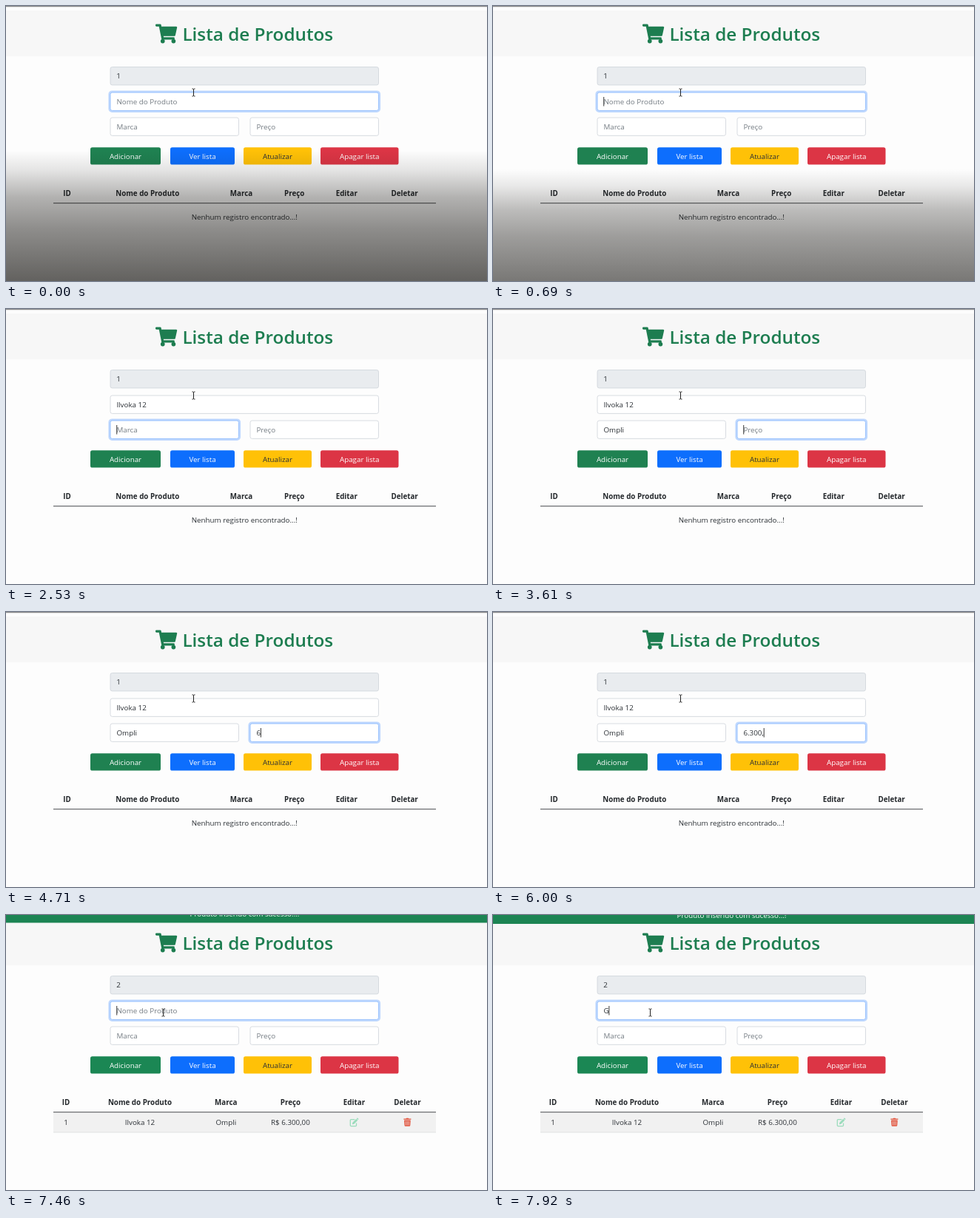
Recreate the animation shown at these times as an HTML page. Size 650 by 372 pixels, loop 8000 ms.

```html
<!DOCTYPE html>
<html lang="pt-BR">
<head>
<meta charset="utf-8">
<title>Lista de Produtos</title>
<style>
  html, body { margin: 0; width: 100%; height: 100%; overflow: hidden; background: #fdfdfd; }
  svg { display: block; width: 650px; height: 372px; }
  text { font: 9.8px "Open Sans", "Noto Sans", sans-serif; fill: #2b3035; white-space: pre; }
  .mid { text-anchor: middle; }
  .title { font-size: 24.3px; font-weight: 600; fill: #1d7d50; }
  .head { font-weight: 700; fill: #24282c; }
  .light { fill: #fff; }
</style>
</head>
<body>
<svg id="stage" viewBox="0 0 650 372">
  <defs>
    <linearGradient id="shade" x1="0" y1="0" x2="0" y2="1">
      <stop offset="0" stop-color="#0c0a06" stop-opacity="0"/>
      <stop offset=".15" stop-color="#0c0a06" stop-opacity=".1"/>
      <stop offset=".36" stop-color="#0c0a06" stop-opacity=".31"/>
      <stop offset=".6" stop-color="#0c0a06" stop-opacity=".46"/>
      <stop offset="1" stop-color="#0c0a06" stop-opacity=".64"/>
    </linearGradient>
  </defs>
</svg>
<script>
const NS = "http://www.w3.org/2000/svg";
const stage = document.getElementById("stage");
const LOOP = 8000, ADD = 6780, REFOCUS = 7300;

function el(tag, attrs, parent = stage) {
  const node = document.createElementNS(NS, tag);
  for (const key in attrs) node.setAttribute(key, attrs[key]);
  parent.appendChild(node);
  return node;
}
function set(node, attrs) {
  for (const key in attrs) node.setAttribute(key, attrs[key]);
}
function label(str, x, y, cls = "", parent = stage) {
  const node = el("text", { x, y, class: cls }, parent);
  node.textContent = str;
  return node;
}
function box(x, y, width, height, fill, stroke = "none", rx = 2.6) {
  return el("rect", { x, y, width, height, rx, fill, stroke, "stroke-width": .8 });
}
function halo(x, y, w, h, color) {
  return el("rect", { x: x - 1.2, y: y - 1.2, width: w + 2.4, height: h + 2.4, rx: 3.6,
    fill: "none", stroke: color, "stroke-width": 2.8, opacity: 0 });
}
const clamp = v => Math.max(0, Math.min(1, v));
const ease = v => v * v * (3 - 2 * v);
const show = (node, on) => node.setAttribute("visibility", on ? "visible" : "hidden");

// Page header
box(0, 6, 650, 62, "#f7f7f7", "none", 0);
const topLine = box(0, 0, 650, 1.2, "#8b8b8b", "none", 0);
const cart = el("g", { transform: "translate(202 24.4) scale(.0508)", fill: "#1d7d50" });
el("path", { d: "M24 0H126Q146 0 150 19L159 64H552Q580 66 575 93L528 301Q523 320 505 320H212L218 352H487Q514 355 510 381L504 416H164L94 64H24Q0 62 0 40V24Q0 2 24 0Z" }, cart);
for (const cx of [192, 480]) el("circle", { cx, cy: 456, r: 56 }, cart);
label("Lista de Produtos", 340.3, 47, "title mid");

// Sliding notice
const notice = el("g", {});
el("rect", { x: 0, y: -30, width: 650, height: 30, fill: "#1c8453" }, notice);
label("Produto inserido com sucesso...!", 322.5, -8.2, "light mid", notice);

// Form
box(141, 82.5, 362.5, 24.4, "#e9ecef", "#ced4da");
const idText = label("1", 149.3, 98.4);

function field(x, y, w, hint) {
  const ring = halo(x, y, w, 24.4, "#bfd8fe");
  const frame = box(x, y, w, 24.4, "#fff", "#ced4da");
  const text = label("", x + 8.4, y + 16);
  return { x, hint, ring, frame, text };
}
const fields = [
  field(141, 117, 362.5, "Nome do Produto"),
  field(141, 151, 173.5, "Marca"),
  field(330, 151, 173.5, "Preço")
];
const caret = el("rect", { width: .9, height: 12.5, fill: "#222" });

const entries = [
  { text: "Ilvoka 12", keys: [1080, 1230, 1380, 1540, 1610, 1690, 2000, 2070, 2150] },
  { text: "Ompli", keys: [2760, 2910, 3000, 3150, 3230] },
  { text: "6.300,00", keys: [4400, 4900, 5090, 5320, 5580, 5850, 6090, 6230] }
];
const again = { text: "G", keys: [7840] };
// Time at which each field gains and loses the focus
const spans = [
  [0, -500, 2380], [1, 2380, 3460], [2, 3460, ADD], [0, REFOCUS, LOOP + 500]
];

const addRing = halo(114, 191.3, 95, 23.2, "#8cc3a9");
const buttons = [
  ["Adicionar", 114, 95, "#1f8151"], ["Ver lista", 222, 87, "#0d6efd"],
  ["Atualizar", 321, 92, "#ffc107"], ["Apagar lista", 425, 105.5, "#dc3545"]
].map(([str, x, w, color], i) => {
  const rect = box(x, 191.3, w, 23.2, color);
  const text = label(str, x + w / 2, 206.6, "mid" + (i === 2 ? "" : " light"));
  return { rect, text };
});

// Table
const rowBg = box(64, 267, 517, 27, "#f1f1f1", "none", 0);
const rowLine = box(64, 293.6, 517, .8, "#d9dbdd", "none", 0);
box(64, 266.2, 517, 1, "#4a4d50", "none", 0);
const emptyCols = [82.5, 191.3, 318, 389.7, 460.3, 538.6];
const filledCols = [81, 181, 297.3, 384.4, 470.5, 542.4];
const heads = ["ID", "Nome do Produto", "Marca", "Preço", "Editar", "Deletar"]
  .map((str, i) => label(str, emptyCols[i], 257.3, "head mid"));
const none = label("Nenhum registro encontrado...!", 322.3, 289.4, "mid");
const row = el("g", {});
["1", entries[0].text, entries[1].text, "R$ " + entries[2].text]
  .forEach((str, i) => label(str, filledCols[i], 284.2, "mid", row));

const pen = el("g", { transform: "translate(464.3 274.6)" }, row);
el("path", { d: "M7 2H2Q1 2 1 3V10Q1 11 2 11H8.2Q9.2 11 9.2 10V7", fill: "none", stroke: "currentColor", "stroke-width": 1.3 }, pen);
el("path", { d: "M4 6.2L9 1.2L11 3.2L6 8.2L3.6 8.6ZM9.5 .7L10.2 0Q10.8-.3 11.5 .5Q12.3 1.4 11.9 2L11.4 2.7Z", fill: "currentColor" }, pen);
const bin = el("g", { transform: "translate(537.4 274.8)" }, row);
el("path", { d: "M0 .8H3L3.6 0H6.4L7 .8H10V2H0ZM.7 2.7H9.3L8.8 10Q8.7 11 7.8 11H2.2Q1.3 11 1.2 10Z", fill: "currentColor" }, bin);
el("path", { d: "M3 4V9.6M5 4V9.6M7 4V9.6", stroke: "#f1f1f1", "stroke-width": .7 }, bin);

// Pointer shapes
const beam = el("path", { d: "M-2-5H-.6L0-4.4L.6-5H2M0-4.4V4.4M-2 5H-.6L0 4.4L.6 5H2", fill: "none", stroke: "#222", "stroke-width": 1 });
const hand = el("path", { d: "M-1 0Q0-1 1 0V4L5 5Q6 5.5 6 7L5 12H0L-4 7Q-4 5.5-2.5 6L-1 7Z", fill: "#fff", stroke: "#222", "stroke-width": .7 });

const shade = el("rect", { x: 0, width: 650, fill: "url(#shade)" });

const route = [
  [0, 253.5, 117], [6200, 253.5, 117], [6560, 196, 184], [6680, 187, 200], [6790, 187, 200],
  [7000, 217, 129], [7250, 212.5, 132], [LOOP, 212.5, 132]
];
function pointerAt(t) {
  let i = 1;
  while (i < route.length - 1 && t > route[i][0]) i++;
  const [t0, x0, y0] = route[i - 1], [t1, x1, y1] = route[i];
  const p = ease(clamp((t - t0) / (t1 - t0)));
  return [x0 + (x1 - x0) * p, y0 + (y1 - y0) * p];
}

function draw(t) {
  const added = t >= ADD;
  const focus = spans.find(([, from, to]) => t >= from && t < to);

  fields.forEach((f, i) => {
    const entry = added ? (i === 0 ? again : null) : entries[i];
    const value = entry ? entry.text.slice(0, entry.keys.filter(k => k <= t).length) : "";
    let glow = 0;
    for (const [id, from, to] of spans)
      if (id === i) glow = Math.max(glow, clamp((t - from) / 150) * (1 - clamp((t - to) / 150)));
    f.ring.setAttribute("opacity", glow);
    f.frame.setAttribute("stroke", glow > .5 ? "#86b7fe" : "#ced4da");
    f.text.textContent = value || f.hint;
    f.text.style.fill = value ? "#2b3035" : "#747c83";

    if (focus && focus[0] === i) {
      const last = Math.max(focus[1], ...entry.keys.filter(k => k <= t));
      const wait = t < 1080 ? t - 690 : t - last;
      const lit = wait >= 0 && Math.floor(wait / 530) % 2 === 0;
      const width = value ? f.text.getComputedTextLength() : 0;
      set(caret, { x: f.x + 8.3 + width, y: i === 0 ? 123 : 157 });
      show(caret, lit);
    }
  });
  if (!focus) show(caret, false);

  idText.textContent = added ? "2" : "1";
  heads.forEach((h, i) => h.setAttribute("x", (added ? filledCols : emptyCols)[i]));
  show(none, !added);
  for (const part of [row, rowBg, rowLine]) show(part, added);
  pen.setAttribute("color", t < 7250 ? "#8fc5a8" : "#9bdcbc");
  bin.setAttribute("color", t < 7250 ? "#ad625e" : "#e2563f");

  const pressed = t >= 6650 && t < REFOCUS;
  buttons[0].rect.setAttribute("fill", pressed ? "#157044" : added ? "#1b8754" : "#1f8151");
  addRing.setAttribute("opacity", clamp((t - ADD + 80) / 150) * (1 - clamp((t - REFOCUS) / 150)));

  const drop = 9 * clamp((t - ADD) / 200) + 3 * clamp((t - 7000) / 920);
  notice.setAttribute("transform", `translate(0 ${drop})`);
  show(notice, added);
  show(topLine, !added);

  const [x, y] = pointerAt(t);
  const overButton = y > 190;
  for (const shape of [beam, hand]) shape.setAttribute("transform", `translate(${x} ${y})`);
  show(beam, !overButton);
  show(hand, overButton);

  // The shade sinks and thins out in short steps
  const step = t < 690 ? 0 : Math.floor((t - 690) / 76.5) + 1;
  const left = Math.max(0, 1 - step / 7);
  const top = 195 + 180 * (1 - left);
  set(shade, { y: top, height: Math.max(1, 372 - top), opacity: left });
}

const start = performance.now();
function tick() {
  draw((performance.now() - start) % LOOP);
  requestAnimationFrame(tick);
}
tick();
</script>
</body>
</html>
```
